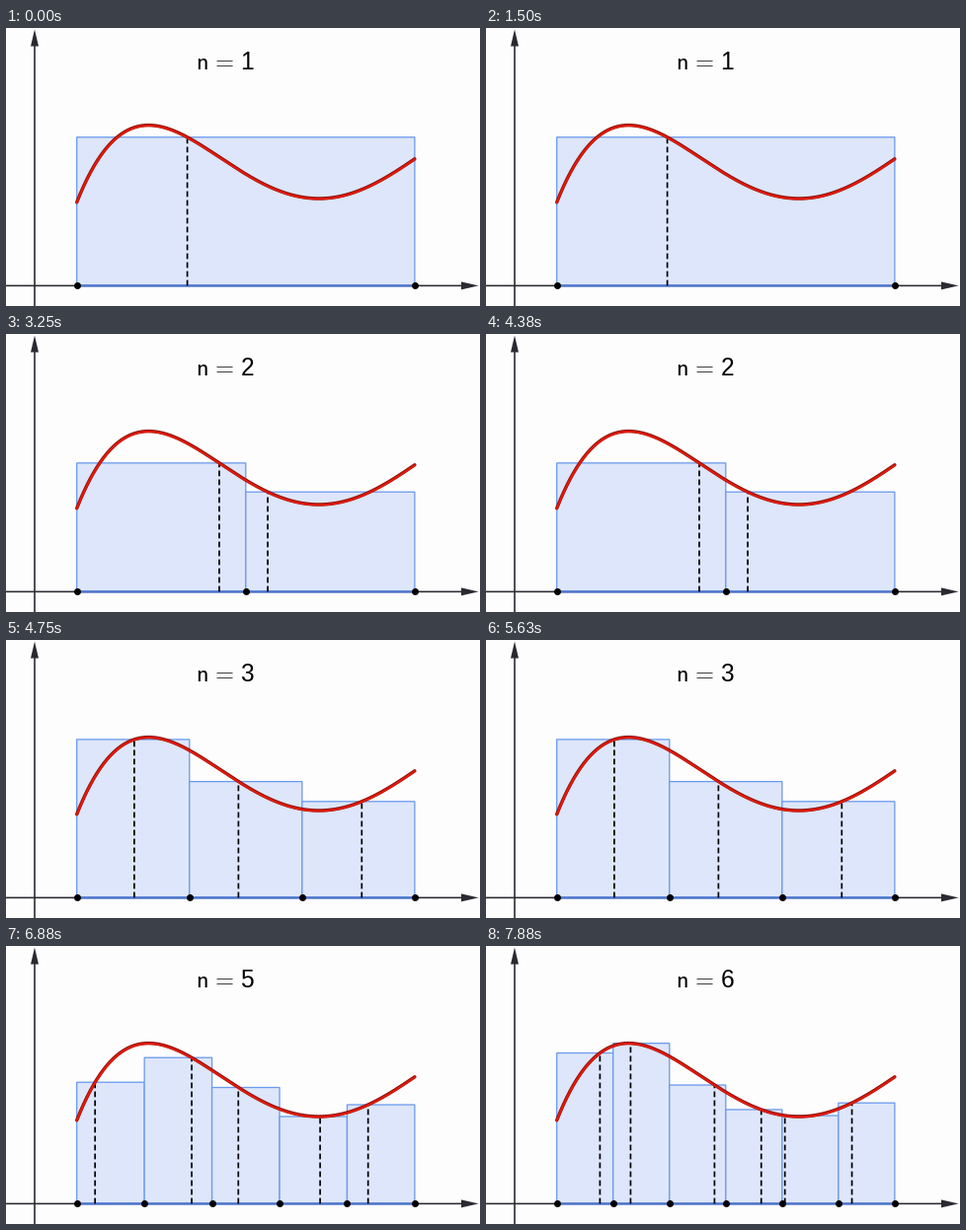
These frames come from a looping animation (480x282 px, 8 s). A matplotlib script:

```python
import numpy as np
import matplotlib.pyplot as plt
from matplotlib.animation import FuncAnimation
from matplotlib.patches import Polygon, Rectangle

WIDTH, HEIGHT, DPI = 480, 282, 96
PX = 72 / DPI  # points per pixel
FRAMES, INTERVAL = 64, 125
LEFT, RIGHT, BASE = 71.7, 413.9, 261.4
INK = "#2a2a32"

# Frames at which one more cell is added
STEPS = [26, 36, 46, 55, 63]

# Random position of the sample inside each cell: 1 cell, then 2, 3, ...
DRAWS = [.327,
         .843, .13,
         .51, .435, .53,
         .34, .56, .55, .51,
         .27, .70, .39, .60, .31,
         .766, .31, .80, .63, .05, .24]

# Smooth polynomial through a few key points
KEY_X = np.array([72, 90.5, 129.5, 183.5, 265, 316, 370.5, 414])
KEY_Y = np.array([176, 137.7, 101, 110.7, 160.2, 173, 159.2, 132.7])
curve = np.polynomial.Polynomial.fit(KEY_X, KEY_Y, 6)

plt.rcParams["mathtext.fontset"] = "cm"
fig = plt.figure(figsize=(WIDTH / DPI, HEIGHT / DPI), dpi=DPI, facecolor="#fdfdfd")
ax = fig.add_axes([0, 0, 1, 1])
ax.set(xlim=(0, WIDTH), ylim=(HEIGHT, 0))
ax.axis("off")


def line(xs, ys, color, width, z, **style):
    return ax.plot(xs, ys, color=color, lw=width * PX, zorder=z,
                   snap=False, **style)[0]


def arrow_head(points):
    ax.add_patch(Polygon(points, fc=INK, ec="none", zorder=1))


line([0, 465], [BASE, BASE], INK, 1.6, 1)
line([29, 29], [HEIGHT, 14], INK, 1.6, 1)
arrow_head([(478.5, BASE), (461, BASE - 4), (461, BASE + 4)])
arrow_head([(29, 1.5), (25, 18.5), (33, 18.5)])
line([LEFT, RIGHT], [BASE, BASE], "#4a74cf", 2.4, 4)

xs = np.linspace(LEFT, RIGHT, 300)
line(xs, curve(xs), "#8f1006", 3.4, 7, solid_capstyle="round")
line(xs, curve(xs) + 0.4, "#e41a0c", 2, 8, solid_capstyle="round")

label = ax.text(192, 41.5, "", fontsize=24.5 * PX, color="black",
                va="baseline", family="Liberation Sans")
dots = line([], [], "black", 0, 6, marker="o", ms=7 * PX, mew=0)
cells = []


def draw(frame):
    while cells:
        cells.pop().remove()
    n = 1 + sum(frame >= step for step in STEPS)
    first = n * (n - 1) // 2
    edges = np.linspace(LEFT, RIGHT, n + 1)
    cell_width = (RIGHT - LEFT) / n
    for x0, share in zip(edges, DRAWS[first:first + n]):
        x = x0 + share * cell_width
        top = curve(x)
        cell = Rectangle((x0, top), cell_width, BASE - top, fc="#dde6fa",
                         ec="#6c9aee", lw=1.3 * PX, zorder=2, snap=False)
        cells.append(ax.add_patch(cell))
        cells.append(line([x, x], [BASE, top], "black", 1.7, 5,
                          dashes=(3.4, 1.9), dash_capstyle="butt"))
    dots.set_data(edges, np.full(n + 1, BASE))
    label.set_text(rf"$\mathsf{{n}}\hspace{{0.12}}=\hspace{{0.12}}${n}")
    return [label, dots, *cells]


anim = FuncAnimation(fig, draw, frames=FRAMES, interval=INTERVAL,
                     init_func=lambda: draw(0), repeat=True, repeat_delay=0)
plt.show()
```
